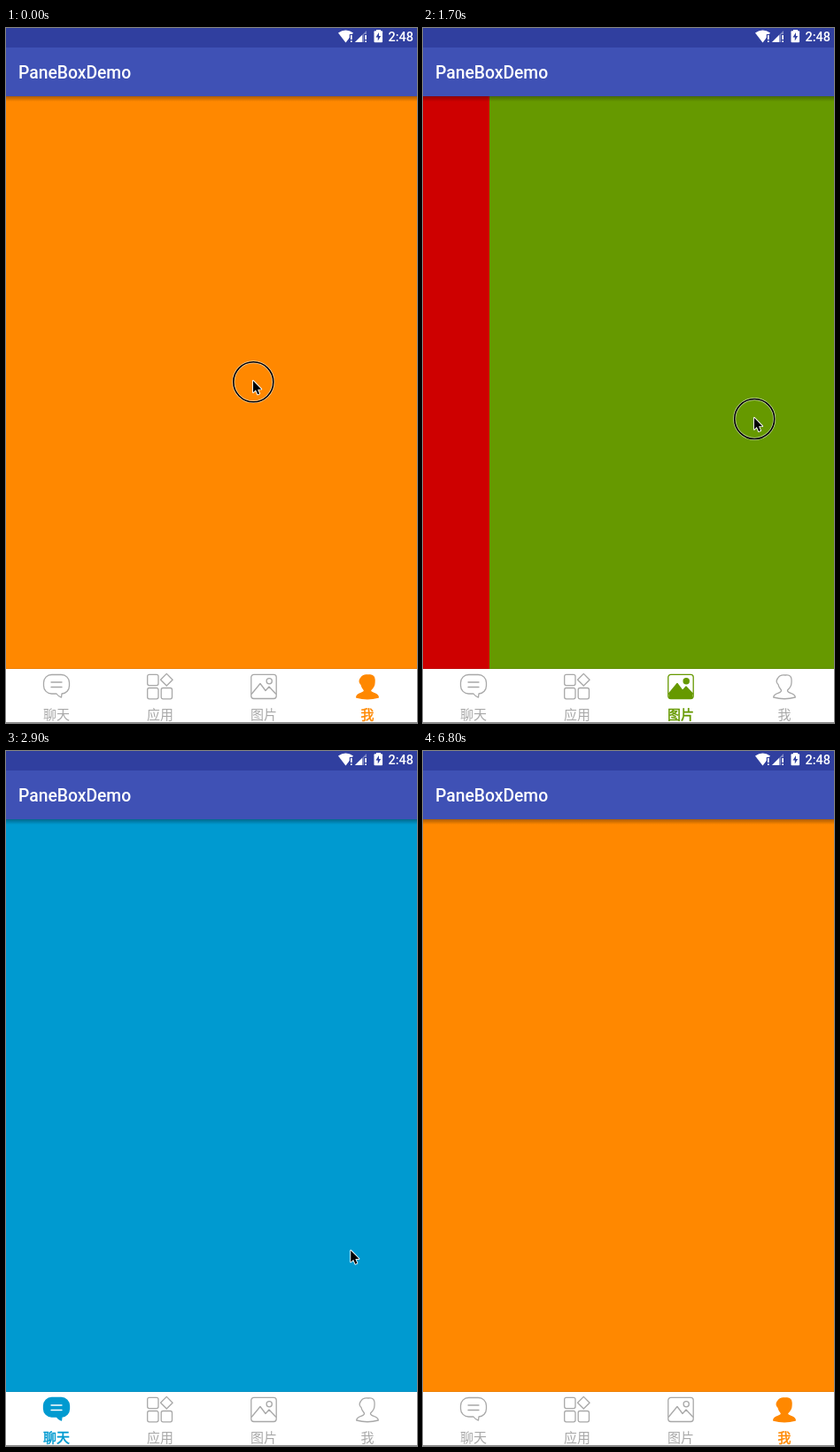
An HTML page with a canvas for the animation above (6820 ms loop, 464 by 784 pixels).

```html
<!DOCTYPE html>
<html lang="zh-CN">
<head>
<meta charset="utf-8">
<title>PaneBoxDemo</title>
<style>
html, body { margin: 0; width: 100%; height: 100%; overflow: hidden; background: #fff; }
canvas { display: block; width: 464px; height: 784px; }
</style>
</head>
<body>
<canvas id="stage" width="464" height="784"></canvas>
<script>
const ctx = document.getElementById('stage').getContext('2d');
const W = 464, H = 784, LOOP = 6820;
const BAR = 77, TABS = 723, GREY = '#a8a8a8', DARK = '#303f9f';
const CJK = '"Noto Sans CJK SC", "Noto Sans CJK", sans-serif';
const ROBOTO = 'Roboto, sans-serif';
const SETTLE = 400, HIDE = 6340;

const tabs = [
  { label: '聊天', color: '#009ad0', icon: chatIcon },
  { label: '应用', color: '#ce0000', icon: appsIcon },
  { label: '图片', color: '#669900', icon: pictureIcon },
  { label: '我', color: '#ff8800', icon: personIcon }
];

// Each swipe drags in the page to the left, then lets it settle
const swipes = [
  { start: 725, end: 955, drag: 124 },
  { start: 1600, end: 1800, drag: 148 },
  { start: 2330, end: 2497, drag: 130 }
];
// Taps switch pages at once
const taps = [{ at: 3440, page: 2 }, { at: 4280, page: 3 }];

// The pointer rests between moves; a move with "down" is a swipe
const home = { x: 279, y: 398 };
const moves = [
  { start: 80, end: 620, x: 431, y: 412, down: true },
  { start: 920, end: 1400, x: 255, y: 432 },
  { start: 1480, end: 1800, x: 409, y: 442, down: true },
  { start: 1900, end: 2200, x: 250, y: 486 },
  { start: 2280, end: 2460, x: 430, y: 494, down: true },
  { start: 2680, end: 3320, x: 282, y: 746 },
  { start: 3620, end: 4140, x: 398, y: 744 },
  { start: 4920, end: 5520, x: 257, y: 455 }
];

const clamp = v => Math.max(0, Math.min(1, v));
const progress = (t, { start, end }) => clamp((t - start) / (end - start));
const smooth = k => k * k * (3 - 2 * k);

function pageState(t) {
  let pos = 3, selected = 3;
  for (const s of swipes) {
    const settled = 1 - (1 - clamp((t - s.end) / SETTLE)) ** 5;
    pos -= (s.drag * progress(t, s) + (W - s.drag) * settled) / W;
    if (t >= s.end) selected--;
  }
  for (const tap of taps) if (t >= tap.at) pos = selected = tap.page;
  return { pos, selected };
}

function pointerAt(t) {
  let { x, y } = home;
  for (const m of moves) {
    const k = smooth(progress(t, m));
    x += (m.x - x) * k;
    y += (m.y - y) * k;
  }
  return { x, y };
}

function isPressed(t) {
  return moves.some(m => m.down && t >= m.start - 80 && t < m.end + 20) ||
    taps.some(tap => t >= tap.at - 100 && t < tap.at - 20);
}

function rect(x, y, w, h, color) {
  ctx.fillStyle = color;
  ctx.fillRect(x, y, w, h);
}

function box(x, y, w, h, r) {
  ctx.beginPath();
  ctx.roundRect(x, y, w, h, r);
}

function dot(x, y, r) {
  ctx.beginPath();
  ctx.arc(x, y, r, 0, 7);
}

function poly(...pts) {
  ctx.beginPath();
  for (let i = 0; i < pts.length; i += 2) ctx.lineTo(pts[i], pts[i + 1]);
}

function paint(fill) {
  if (fill) ctx.fill();
  ctx.stroke();
}

function text(str, x, y, font, color, align = 'left') {
  ctx.font = font;
  ctx.fillStyle = color;
  ctx.textAlign = align;
  ctx.fillText(str, x, y);
}

// Icons are centred on x = 0, with y from 0 to 29
function chatIcon(on) {
  ctx.beginPath();
  ctx.moveTo(0, 22.5);
  ctx.quadraticCurveTo(2, 25.5, 5.5, 26.5);
  ctx.lineTo(6, 22.5);
  ctx.arcTo(14.5, 22, 14.5, 11, 9);
  ctx.arcTo(14.5, 1, 0, 1, 9);
  ctx.arcTo(-14.5, 1, -14.5, 11, 9);
  ctx.arcTo(-14.5, 22.5, 0, 22.5, 9);
  ctx.closePath();
  paint(on);
  if (on) ctx.strokeStyle = '#fff';
  for (const y of [9.5, 15]) {
    poly(-6, y, 6, y);
    ctx.stroke();
  }
}

function appsIcon(on) {
  for (let i = 1; i < 4; i++) {
    box(i === 3 ? 1.2 : -14.3, i === 1 ? 0.8 : 16, 12.3, 12.3, 2);
    paint(on);
  }
  const r = 6.8;
  poly(7.3, 6.7 - r, 7.3 + r, 6.7, 7.3, 6.7 + r, 7.3 - r, 6.7);
  ctx.closePath();
  paint(on);
}

function pictureIcon(on) {
  box(-14.2, 0.8, 28.4, 27.2, 3);
  ctx.stroke();
  dot(6.2, 8.3, 3.1);
  paint(on);
  poly(-13.5, 22.5, -4, 11, 2, 19, 6, 14.5, 13.5, 22.5);
  ctx.stroke();
  if (on) {
    ctx.lineTo(13.5, 27.5);
    ctx.lineTo(-13.5, 27.5);
    ctx.fill();
  }
}

function personIcon(on) {
  ctx.beginPath();
  ctx.moveTo(-3.5, 18.5);
  ctx.quadraticCurveTo(-6.5, 15, -7, 12);
  ctx.quadraticCurveTo(-10.5, 9, -7.5, 5);
  ctx.quadraticCurveTo(-5, 0.5, 1, 1.5);
  ctx.quadraticCurveTo(9, 0, 8, 10);
  ctx.quadraticCurveTo(8, 14.5, 3.5, 18.5);
  ctx.bezierCurveTo(3, 23, 12, 20.5, 12.3, 26.5);
  ctx.quadraticCurveTo(0, 30, -12.3, 26.5);
  ctx.bezierCurveTo(-12, 20.5, -3, 23, -3.5, 18.5);
  ctx.closePath();
  paint(on);
}

function drawPages(pos) {
  tabs.forEach((tab, i) => {
    const x = Math.round((i - pos) * W);
    if (Math.abs(x) < W) rect(x, BAR, W, TABS - BAR, tab.color);
  });
  const shade = ctx.createLinearGradient(0, BAR, 0, BAR + 6);
  shade.addColorStop(0, 'rgba(0,0,0,.32)');
  shade.addColorStop(1, 'rgba(0,0,0,0)');
  rect(0, BAR, W, 6, shade);
  rect(0, TABS - 1, W, 1, 'rgba(0,0,0,.07)');
}

function alertMark(x) {
  rect(x - 1.2, 7, 4, 10, DARK);
  rect(x, 8, 1.7, 5, '#fff');
  rect(x, 14.3, 1.7, 1.7, '#fff');
}

function drawHeader() {
  rect(0, 0, W, 22, DARK);
  rect(0, 22, W, BAR - 22, '#3f51b5');
  text('PaneBoxDemo', 14, 56.5, '500 19.3px ' + ROBOTO, '#fff');
  text('2:48', 460, 15, '500 14.5px ' + ROBOTO, '#fff', 'right');

  ctx.beginPath();
  ctx.moveTo(375, 5.5);
  ctx.quadraticCurveTo(383.5, -0.5, 392, 5.5);
  ctx.lineTo(383.5, 16.5);
  ctx.fill();
  alertMark(389);

  for (const [size, alpha] of [[13, 0.4], [8, 1]]) {
    ctx.fillStyle = `rgba(255,255,255,${alpha})`;
    poly(394, 16, 394 + size, 16, 394 + size, 16 - size);
    ctx.fill();
  }
  alertMark(405.3);

  rect(418, 2, 5, 2, '#fff');
  box(415.5, 3.2, 9.6, 13, 1);
  ctx.fill();
  ctx.fillStyle = DARK;
  poly(421, 5, 417.5, 10.5, 419.8, 10.5, 419.8, 14.5, 423.2, 9, 421, 9);
  ctx.fill();
}

function drawTabs(selected) {
  rect(0, TABS, W, H - TABS, '#fff');
  rect(0, H - 1, W, 1, '#8a8a8a');
  tabs.forEach((tab, i) => {
    const on = i === selected, color = on ? tab.color : GREY;
    ctx.save();
    ctx.translate(57 + i * 117, 728.5);
    ctx.fillStyle = ctx.strokeStyle = color;
    ctx.lineWidth = 1.3;
    ctx.lineJoin = ctx.lineCap = 'round';
    tab.icon(on);
    text(tab.label, 0, 51.5, '15px ' + CJK, color, 'center');
    if (on) {
      ctx.strokeStyle = color;
      ctx.lineWidth = 0.5;
      ctx.strokeText(tab.label, 0, 51.5);
    }
    ctx.restore();
  });
}

function outline(color, width) {
  ctx.strokeStyle = color;
  ctx.lineWidth = width;
  ctx.stroke();
}

function drawPointer(t) {
  if (t >= HIDE) return;
  const { x, y } = pointerAt(t);
  ctx.save();
  ctx.translate(x, y);
  if (isPressed(t)) {
    dot(0.3, 1.3, 22.5);
    outline('rgba(255,255,255,.65)', 3);
    outline('#000', 1.6);
  }
  ctx.scale(0.9, 0.9);
  poly(0, 0, 0, 14.5, 3.3, 11.5, 5.7, 17, 8, 16, 5.7, 10.7, 10.3, 10.5);
  ctx.closePath();
  ctx.lineJoin = 'round';
  outline('#fff', 2);
  ctx.fillStyle = '#000';
  ctx.fill();
  ctx.restore();
}

function draw(t) {
  const { pos, selected } = pageState(t);
  drawPages(pos);
  drawHeader();
  drawTabs(selected);
  drawPointer(t);
}

const begin = performance.now();
function tick() {
  draw((performance.now() - begin) % LOOP);
  requestAnimationFrame(tick);
}
tick();
</script>
</body>
</html>
```
